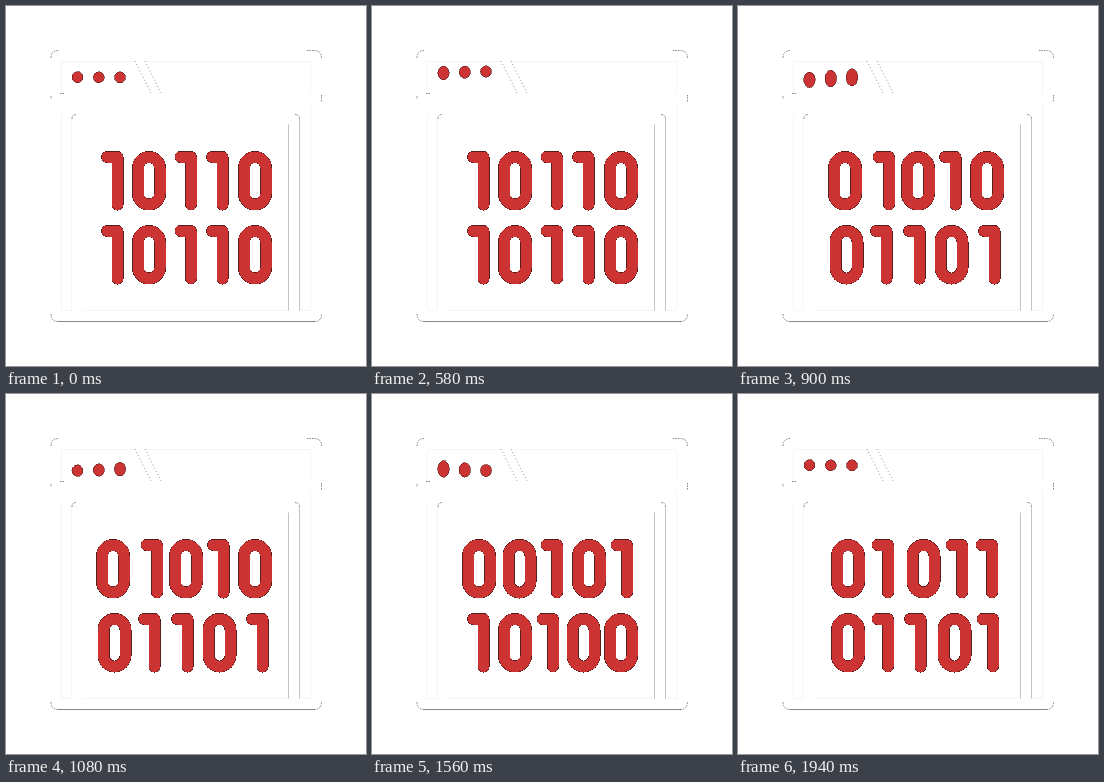
Recreate the animation shown at these times as an HTML page. Size 360 by 360 pixels, loop 2400 ms.

```html
<!DOCTYPE html>
<html lang="en">
<head>
<meta charset="utf-8">
<title>Binary window</title>
<style>
html, body { margin: 0; width: 100%; height: 100%; overflow: hidden; background: #fff; }
svg { display: block; width: 100vw; height: 100vh; }
.faint, .line, .edge, .digits { fill: none; }
.faint { stroke: #f5f5f5; }
.line { stroke: #c4c4c4; }
.edge { stroke: #666; stroke-width: .8; stroke-dasharray: 1.5 1; }
.slash { stroke: #777; stroke-dasharray: 1 2.5; }
.digits { stroke-linecap: round; stroke-linejoin: round; shape-rendering: crispEdges; }
.rim { stroke: #571c1c; stroke-width: 12; }
.face { stroke: #cc3333; stroke-width: 11; }
.dots { fill: #cc3333; stroke: #571c1c; stroke-width: .6; shape-rendering: crispEdges; }
</style>
</head>
<body>
<svg viewBox="0 0 360 360">
  <g class="faint">
    <path d="M55.5 87.5V55.5H129M139 55.5H304.5V87.5"/>
    <path d="M55.5 108V304.5H65.5V112M76.5 304.5H282.5"/>
    <path d="M293.5 304.5H304.5V96"/>
  </g>
  <g class="line">
    <path d="M282.5 118.5V304.5M293.5 112V304.5"/>
    <path d="M52 315.5H309" stroke="#888"/>
  </g>
  <g class="edge">
    <path d="M45 52Q45 44.500 52.500 44.500M301 44.500H308Q315.500 44.500 315.500 52"/>
    <path d="M45 308Q45 315.500 52.500 315.500M308 315.500Q315.500 315.500 315.500 308"/>
    <path d="M45 90V93M315.500 89V96M54 87.500H58"/>
    <path class="slash" d="M129 55L145 87M139 55L155 87"/>
    <path d="M66 113Q66 108.500 70 108.500M289 108.500Q293.500 108.500 293.500 113"/>
  </g>
  <g class="dots"></g>
  <path class="digits rim"/>
  <path class="digits face"/>
</svg>
<script>
const LOOP = 2400;
const STEP = 600;
const STAGGER = 55;
const REST = 71.3, HIGH = 65.3, LOW = 77;

// Each row: its digits, then the x of every zero's centre or one's stem.
const screens = [
  [['10110', [111.5, 143, 185, 216.5, 249]], ['10110', [111.5, 143, 185, 216.5, 249]]],
  [['01010', [107, 151, 180, 217.5, 249]], ['01101', [108.5, 148.5, 181.5, 213.5, 256.5]]],
  [['00101', [107, 147.5, 185, 217, 255]], ['10100', [111.5, 143, 181, 211.5, 249]]],
  [['01011', [110, 150, 185.5, 224, 254]], ['01101', [110, 150, 182.5, 216.5, 255]]]
];

// Start, end, and the heights travelled between.
const legs = [
  [0, 340, REST, HIGH],
  [400, 1160, HIGH, LOW],
  [1380, 1830, LOW, REST]
];

const one = (x, y) => `M${x - 10.5} ${y}H${x}V${y + 47.5}`;
const zero = (x, y) =>
  `M${x - 11} ${y + 11}a11 11 0 0 1 22 0v25.500a11 11 0 0 1 -22 0z`;

const paths = screens.map(rows => rows.map(([bits, xs], r) =>
  xs.map((x, i) => (bits[i] === '1' ? one : zero)(x, 151 + r * 74)).join('')
).join(''));

const ease = p => p * p * (3 - 2 * p);

function pose(t) {
  let y = REST, stretch = 0;
  for (const [start, end, from, to] of legs) {
    if (t < start) break;
    const e = ease(Math.min(1, (t - start) / (end - start)));
    y = from + (to - from) * e;
    stretch = Math.pow(4 * e * (1 - e), 1.2);
  }
  return { y, stretch };
}

const digits = document.querySelectorAll('.digits');
const group = document.querySelector('.dots');
const dots = [71.5, 92.8, 114].map(x => {
  const dot = document.createElementNS('http://www.w3.org/2000/svg', 'ellipse');
  dot.setAttribute('cx', x);
  group.append(dot);
  return dot;
});

let shown = -1;
function draw(now) {
  const t = now % LOOP;
  const screen = Math.floor(t / STEP);
  if (screen !== shown) {
    digits.forEach(path => path.setAttribute('d', paths[screen]));
    shown = screen;
  }
  dots.forEach((dot, i) => {
    const { y, stretch } = pose(t - i * STAGGER);
    dot.setAttribute('cy', y);
    dot.setAttribute('rx', 5.5 + .3 * stretch);
    dot.setAttribute('ry', 5.5 + 3.1 * stretch);
  });
}

const origin = performance.now();
function tick() {
  draw(performance.now() - origin);
  requestAnimationFrame(tick);
}
tick();
</script>
</body>
</html>
```
